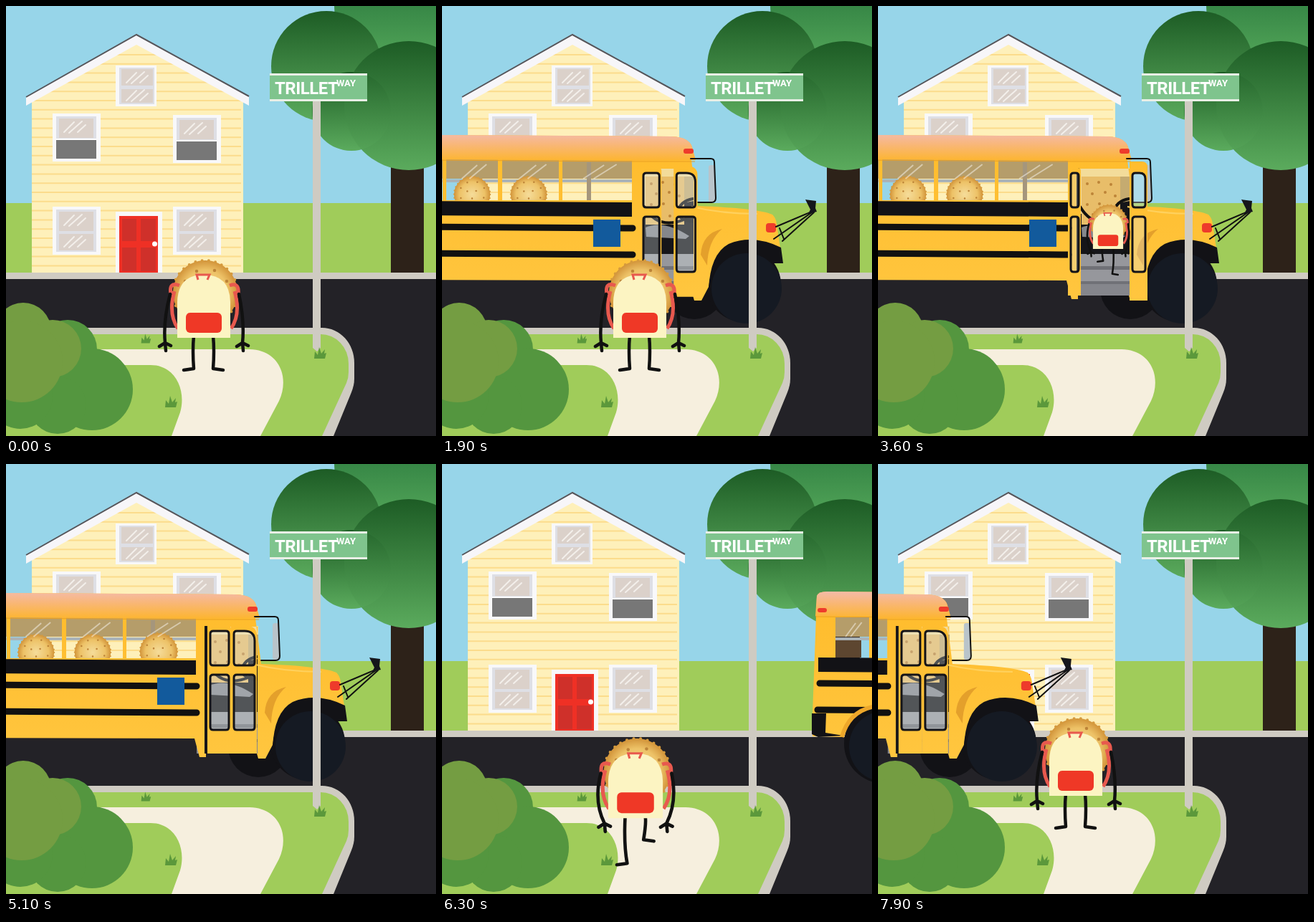
These frames come from a looping animation (600 by 600 pixels, 8000 ms). An HTML page:

```html
<!DOCTYPE html>
<html lang="en">
<head>
<meta charset="utf-8">
<title>School bus stop</title>
<style>
html, body { margin: 0; width: 100%; height: 100%; overflow: hidden; }
svg { display: block; width: 100vw; height: 100vh; }
.line { fill: none; stroke: #111; stroke-linecap: round; stroke-linejoin: round; }
text { font-family: Roboto, "Liberation Sans", sans-serif; font-weight: 700; fill: #fff; }
</style>
</head>
<body>
<svg viewBox="0 0 600 600">
<defs>
  <linearGradient id="leaf" x2="0" y2="1"><stop stop-color="#1d5c25"/><stop offset="1" stop-color="#5bab5d"/></linearGradient>
  <linearGradient id="crown" gradientUnits="userSpaceOnUse" x1="0" x2="0" y1="0" y2="102"><stop stop-color="#378746"/><stop offset="1" stop-color="#5cb05f"/></linearGradient>
  <linearGradient id="paint" gradientUnits="userSpaceOnUse" x1="0" x2="0" y1="178" y2="216"><stop stop-color="#f4bba8"/><stop offset=".35" stop-color="#f8b77f"/><stop offset="1" stop-color="#fdb52f"/></linearGradient>
  <linearGradient id="side" gradientUnits="userSpaceOnUse" x1="0" x2="0" y1="216" y2="410"><stop stop-color="#ffbd2e"/><stop offset="1" stop-color="#ffc63f"/></linearGradient>
  <radialGradient id="crust"><stop stop-color="#f5dc9a"/><stop offset=".7" stop-color="#edc267"/><stop offset="1" stop-color="#d2943a"/></radialGradient>
  <g id="cracker">
    <circle r="45" fill="url(#crust)"/>
    <circle r="45" fill="none" stroke="#d59a3d" stroke-width="4" stroke-linecap="round" stroke-dasharray="0 9.42"/>
    <path d="M-28-16h0M-12-30h0M13-31h0M30-16h0M-12-8h0M10-9h0M-28 9h0M29 8h0M0 10h0" class="line" style="stroke:#bd8438;stroke-width:4.500"/>
  </g>
  <path id="shine" d="M10 22 24 8M17 23 35 7M29 22 40 12" fill="none" stroke="#f3efeb" stroke-width="2" stroke-linecap="round"/>
  <g id="frame">
    <path d="M0 0H67V67H0Z" fill="#f8f8fa"/>
    <path d="M5 4H61V63H5Z" fill="#dedfe5"/>
    <path d="M9 7H57V34H9ZM9 38H57V61H9Z" fill="#dbd1ca"/>
    <use href="#shine" x="6" y="4"/>
  </g>
  <g id="openFrame"><use href="#frame"/><path d="M5 36H61V63H5Z" fill="#777"/><path d="M5 36H61" stroke="#fff" stroke-width="2"/></g>
  <g id="shutFrame"><use href="#frame"/><use href="#shine" x="6" y="34"/></g>
  <path id="tuft" d="M-8 8 -7-2-3 3-1-8 2 1 7-5 6 1 9 0 7 8Z" fill="#5b983b"/>
</defs>

<path d="M0 0H600V276H0Z" fill="#97d5e9"/>
<path d="M0 275H600V380H0Z" fill="#a0cc5a"/>

<path d="M36 372V130L182 46 331 130V372Z" fill="#fef0ba"/>
<path id="siding" stroke="#fbdc8c" stroke-width="2"/>
<path d="M28 127 182 39 339 126V139L182 54 28 139Z" fill="#f7f6f9"/>
<path d="M28 127 182 40 339 126" fill="none" stroke="#55555a" stroke-width="2"/>
<path d="M153 83H210V140H153Z" fill="#f8f8fa"/>
<path d="M158 86H207V137H158Z" fill="#dedfe5"/>
<path d="M161 88H205V111H161ZM161 116H205V135H161Z" fill="#dbd1ca"/>
<use href="#shine" x="158" y="85"/><use href="#shine" x="158" y="110"/>
<use href="#openFrame" x="65" y="150"/><use href="#openFrame" x="233" y="152"/>
<use href="#shutFrame" x="65" y="280"/><use href="#shutFrame" x="233" y="280"/>
<path d="M153 287H218V372H153Z" fill="#f8f8fa"/>
<path d="M158 293H212V372H158Z" fill="#ef3025"/>
<path d="M162 297H182V328H162ZM188 297H209V328H188ZM162 337H182V370H162ZM188 337H209V370H188Z" fill="#cf302a"/>
<circle cx="207.500" cy="332" r="3.500" fill="#fff"/>

<path d="M537 190H583V373H537Z" fill="#2d2219"/>
<circle cx="560" r="102" fill="url(#crown)"/>
<circle cx="447" cy="84" r="77" fill="url(#leaf)"/>
<circle cx="482" cy="147" r="55" fill="url(#leaf)"/>
<circle cx="562" cy="139" r="90" fill="url(#leaf)"/>
<circle cx="482" cy="147" r="55" fill="url(#leaf)" opacity=".35"/>

<path d="M0 381H600V600H0Z" fill="#232227"/>
<path d="M0 372H600V381H0Z" fill="#cfcbc2"/>

<g id="bus">
  <g fill="#121216"><circle cx="352" cy="395" r="42"/><circle cx="421" cy="389" r="52"/><circle cx="-213" cy="390" r="56"/></g>
  <path d="M-285 210H266V241H-285Z" fill="#b59d6a"/>
  <path d="M-285 244H265" stroke="#aab3b8" stroke-width="4"/>
  <path d="M-281 246H-245V270H-281Z" fill="#5d4630"/>
  <path d="M202 218H208V271H202Z" fill="#a5967c"/>
  <path d="M266 226H352V290H266Z" fill="#f3dc9a"/>
  <path d="M318 238H352V274H318Z" fill="#c5ab70"/>
  <path d="M266 290H330V276L352 272V348H266Z" fill="#151519"/>
  <path d="M284 238H338V305H284Z" fill="#e8bd69"/>
  <path d="M292 248h0M308 246h0M325 249h0M299 262h0M317 260h0M331 265h0M292 277h0M309 276h0M325 280h0M300 291h0M318 293h0" class="line" style="stroke:#bd8438;stroke-width:4"/>
  <path d="M284 309Q310 298 345 321L340 325 285 322Z" fill="#85878c"/>
  <path d="M282 280Q302 314 340 297M350 269Q332 272 329 288Q330 298 350 301" class="line" stroke-width="4"/>
  <path d="M266 346H352V404H266Z" fill="#96979c"/>
  <path d="M266 363H352V368H266ZM266 384H352V388H266Z" fill="#707177"/>
  <path d="M266 388H352V404H266Z" fill="#85868c"/>
  <use href="#cracker" transform="translate(42 263) scale(.56)"/>
  <use href="#cracker" transform="translate(121 263) scale(.56)"/>
  <use id="rider" href="#cracker"/>
  <g id="aisle"></g>
  <path id="glare" fill="none" stroke="#fff" stroke-opacity=".45" stroke-width="2"/>
  <g fill-rule="evenodd"><path id="shell" fill="url(#side)"/></g>
  <path d="M-307 184Q-305 178-293 178L320 182Q345 183 349 197L354 215 265 216-309 212Z" fill="url(#paint)"/>
  <path d="M-309 213 265 217H353" fill="none" stroke="#e99f25"/>
  <path d="M-305 270 265 274V294L-305 290Z" fill="#121216"/>
  <path d="M-303 306 266 310M-306 343 266 347" class="line" stroke-width="9"/>
  <path d="M-314 348H-294L-295 375-270 379-305 381-314 377Z" fill="#121216"/>
  <path d="M-272 381Q-260 338-213 337Q-166 338-154 381" fill="none" stroke="#eda72a" stroke-width="6"/>
  <path d="M361 347Q363 317 391 311Q371 327 370 362Z" fill="#e4a02b"/>
  <path d="M372 396Q374 346 400 332Q434 318 473 337L476 359H455L425 394Z" fill="#121216"/>
  <path d="M348 280Q390 290 440 290" fill="none" stroke="#ffd15d" stroke-width="2"/>
  <path d="M211 298H249V336H211Z" fill="#125a9c"/>
  <g fill="#ee3b2b"><rect x="337" y="199" width="14" height="7" rx="3"/><rect x="-306" y="201" width="13" height="6" rx="3"/><rect x="452" y="303" width="14" height="13" rx="4"/></g>
  <path d="M279 226V404" stroke="#151519" stroke-width="4"/>
  <rect x="372" y="222" width="9" height="51" rx="3" fill="#b9c4ca"/>
  <path d="M347 213H375Q380 213 380 218L382 268Q382 274 376 274H356" class="line" stroke-width="2"/>
  <g id="doors"></g>
  <g fill="#151a23"><circle cx="425" cy="394" r="49"/><circle cx="-213" cy="394" r="49"/></g>
  <path d="M463 325 516 288M466 308 518 286M475 328 519 288M471 310 477 325" class="line" stroke-width="2"/>
  <path d="M507 270 522 272 521 282 523 287 511 290 514 284Z" fill="#15161b"/>
</g>

<path d="M0 449H441A45 49 0 0 1 486 498V520Q486 529 482 539L457 600H0Z" fill="#cfcbc2"/>
<path d="M0 458H439A39 41 0 0 1 478 499V511Q478 519 475 526L441 600H0Z" fill="#a0cc5a"/>
<path d="M0 479H340C382 480 396 519 381 551L355 600H231L243 567C252 536 236 501 202 501H0Z" fill="#f6efde"/>
<use href="#tuft" transform="translate(195 464) scale(.8)"/>
<use href="#tuft" x="230" y="552"/>

<g fill="#54963f"><circle cx="86" cy="479" r="41"/><circle cx="120" cy="535" r="57"/><circle cx="72" cy="557" r="40"/><circle cx="20" cy="545" r="45"/></g>
<g fill="#749d42"><circle cx="24" cy="453" r="39"/><circle cx="65" cy="478" r="40"/><circle cx="22" cy="496" r="57"/></g>

<g id="yard">
  <g id="kid">
    <use href="#cracker" x="278" y="400"/>
    <path d="M242 390Q227 384 230 402M235 398Q226 430 240 450M312 390Q326 385 324 402M319 398Q328 430 314 450" fill="none" stroke="#e8594e" stroke-width="5"/>
    <path id="limbs" class="line" stroke-width="4.500"/>
    <path d="M239 463V413Q240 375 276 375Q312 375 313 413V463Z" fill="#fcf4c2"/>
    <path d="M268 382 266 375H284L281 382" fill="none" stroke="#e8594e" stroke-width="3"/>
    <rect x="251" y="428" width="50" height="28" rx="6" fill="#ef3826"/>
  </g>
</g>

<path d="M428 132H439V477L434 482 428 477Z" fill="#cfcbc2"/>
<use href="#tuft" x="438" y="484"/>
<path d="M368 94H504V133H368Z" fill="#e9efe6"/>
<path d="M368 97H504V130H368Z" fill="#7fc48d"/>
<text x="375" y="123" font-size="24" letter-spacing="-.5">TRILLET</text>
<text x="461" y="112" font-size="13">WAY</text>
</svg>

<script>
const el = id => document.getElementById(id);
const clamp = v => Math.max(0, Math.min(1, v));
const mix = (a, b, u) => a + (b - a) * u;

let rows = '';
for (let y = 68; y < 370; y += 12.8) {
  const left = Math.max(36, 182 - (y - 46) * 1.74);
  rows += `M${left} ${y}H${Math.min(331, 364 - left)}`;
}
el('siding').setAttribute('d', rows);

const panes = [[-281, -234], [-229, -179], [-174, -120], [-115, -59], [-54, 1], [6, 78], [84, 163], [168, 265]];
const outline = 'M-307 184Q-305 178-293 178L320 182Q345 183 349 197L353 213 348 215 356 279Q440 282 461 291' +
  'Q466 296 467 304L475 358 455 359Q440 337 415 338Q377 345 372 392L362 411H352L350 404H279V409H270L263 383' +
  'L-154 382Q-166 340-213 340Q-260 340-272 381L-313 380V349Z';
el('shell').setAttribute('d', outline + 'M282 227H351V404H282Z' +
  panes.map(([a, b]) => `M${a} 214H${b}V271H${a}Z`).join(''));
el('glare').setAttribute('d', panes.map(([a, b]) =>
  `M${mix(a, b, .3)} 241 ${mix(a, b, .6)} 222M${mix(a, b, .45)} 241 ${mix(a, b, .78)} 221`).join(''));

function door(x0, x1, top, foot, round) {
  const a = x0 + 4, b = x1 - 3;
  const pane = (top, low, r) => `M${a + 4} ${top}H${b - r}Q${b} ${top} ${b} ${top + r}V${low - 4}Q${b} ${low} ${b - 4} ${low}` +
    `H${a + 4}Q${a} ${low} ${a} ${low - 4}V${top + 4}Q${a} ${top} ${a + 4} ${top}Z`;
  const glass = pane(233, 281, round) + pane(294, 371, 4);
  return `<path d="M${x0} ${top}H${x1 - round}Q${x1} ${top} ${x1} ${top + round}V${foot}H${x0}Z${glass}" fill="url(#side)" fill-rule="evenodd"/>
    <path d="${glass}" fill="#dfe6ea" fill-opacity=".3" stroke="#141418" stroke-width="3"/>`;
}

// One foot lifts while the other reaches down; the hands tuck in at each stride.
function limbs(phase, walking) {
  const swing = walking * Math.cos(phase);
  const tuck = 12 * Math.abs(swing);
  return [-1, 1].map(side => {
    const lift = side * swing * (side * swing > 0 ? 14 : 18);
    const hand = 276 + side * (54 - tuck), shoulder = 277 + side * 48;
    const leg = 275.5 + side * 13.5, foot = 506 - lift;
    return `M${shoulder} 402Q${276 + side * 57} 440 ${hand} 470l-8 5M${hand} 470l1 11M${hand} 470l8 4` +
      `M${leg} 460Q${leg + side * 2} ${foot - 25} ${leg - side * Math.abs(lift) * .15} ${foot}l${side * 14} 2`;
  }).join('');
}

function draw(ms) {
  // The stop repeats every 6.9 s inside the 8 s cut, at ten poses a second.
  const n = Math.floor(ms % 8000 / 100) % 69;

  const away = n < 18 ? -3.94 * (18 - n) ** 2 : n > 52 ? 830 * ((n - 52) / 11) ** 2 : 0;
  el('bus').setAttribute('transform', `translate(${away})`);

  const open = clamp((n - 18) / 4) * clamp((47 - n) / 4);
  el('doors').innerHTML = door(mix(281, 265, open), mix(314, 283, open), 226, 404, 4) +
    door(mix(314, 351, open), mix(350, 376, open), mix(226, 217, open), mix(404, 411, open), mix(14, 8, open));

  let x = 276, y = 419, size = 1, walking = 0;
  if (n >= 53) {
    const left = clamp((66 - n) / 13) ** 1.5;
    y += 271 * left;
    x -= 54 * left;
    size += (y - 419) / 1000;
    walking = n < 66 ? 1 : 0;
  } else if (n > 26) {
    const u = clamp((n - 26) / 10), inside = Math.max(0, n - 36);
    x += 45 * u ** .75 - 10 * inside;
    y -= 105 * u + 2 * inside;
    size -= .43 * u;
    walking = 1;
  }
  const kid = el('kid'), place = el(n > 36 && n < 53 ? 'aisle' : 'yard');
  if (kid.parentNode !== place) place.append(kid);
  kid.style.display = n >= 40 && n < 53 ? 'none' : '';
  kid.setAttribute('transform', `translate(${x} ${y}) scale(${size}) translate(-276 -419)`);
  el('limbs').setAttribute('d', limbs((n - 27) * Math.PI / 3, walking));

  const rider = el('rider');
  rider.style.display = n >= 40 ? '' : 'none';
  rider.setAttribute('transform', `translate(${Math.max(213, 280 - 11 * (n - 40))} 262) scale(.58)`);
}

const start = performance.now();
function tick() {
  draw(performance.now() - start);
  requestAnimationFrame(tick);
}
tick();
</script>
</body>
</html>
```
